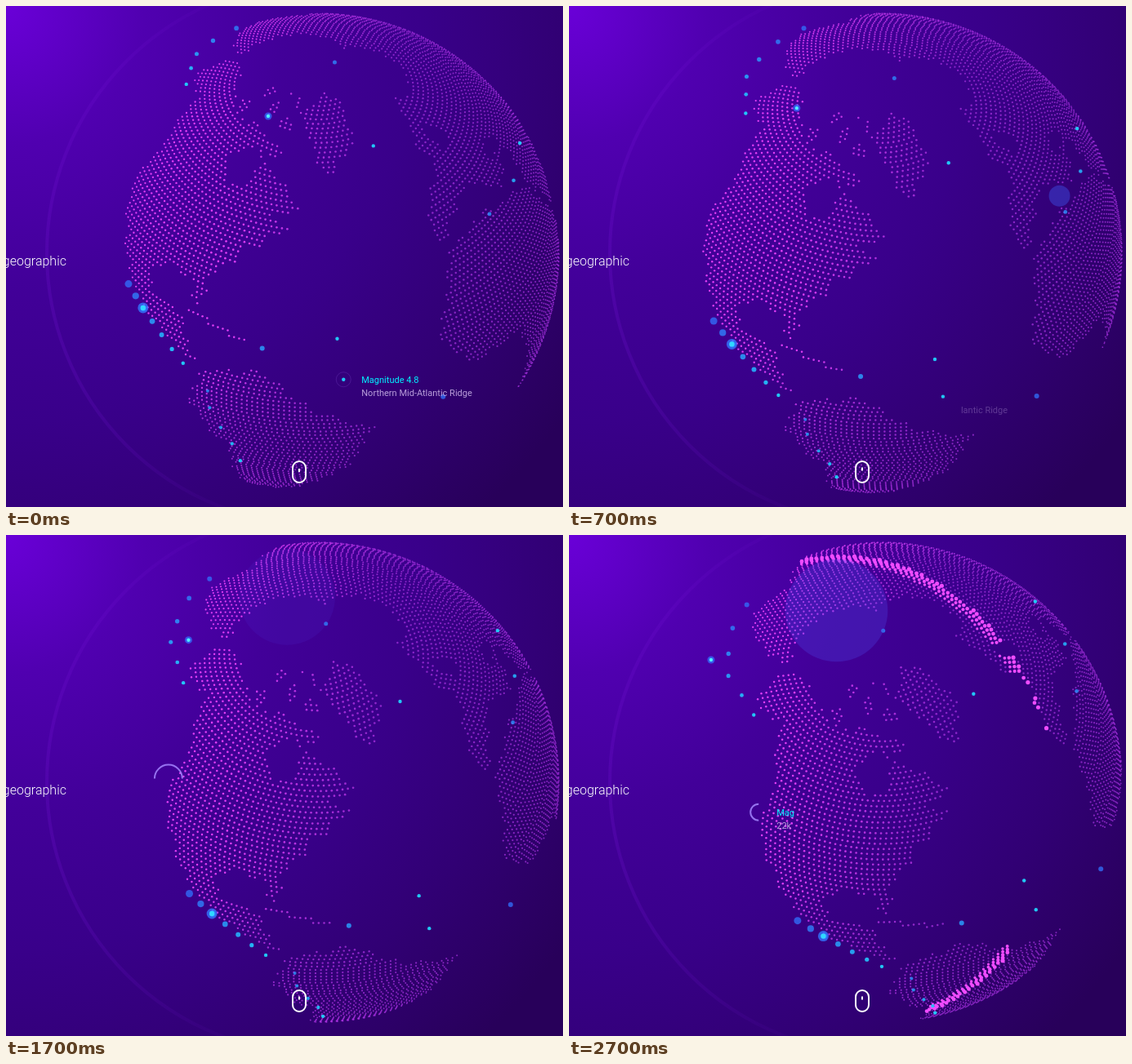
Write an HTML page with a canvas that moves like this. It is 682x614 px and loops after 2.8 s.

```html
<!DOCTYPE html>
<html lang="en">
<head>
<meta charset="utf-8">
<title>Earthquake globe</title>
<style>
  html, body { margin: 0; width: 100%; height: 100%; overflow: hidden; background: #3a0088; }
  canvas { display: block; }
</style>
</head>
<body>
<canvas id="stage" width="682" height="614"></canvas>
<script>
const ctx = document.getElementById('stage').getContext('2d');
const W = 682, H = 614, CX = 383, CY = 303, R = 294, LOOP = 2800, STEP = 100;
const RAD = Math.PI / 180, TAU = Math.PI * 2;
const clamp = (v, lo = 0, hi = 1) => Math.min(hi, Math.max(lo, v));
const mix = (a, b, u) => a + (b - a) * u;

let seed = 7;
function random() {
  seed = (seed * 16807) % 2147483647;
  return seed / 2147483647;
}

// Key corners of each continent as [lon, lat]; coasts are roughened in isLand
const america = [[-166,66],[-156,71],[-110,68],[-82,69],[-78,62],[-65,59],[-56,52],[-66,50],[-59,47],
  [-70,42],[-76,36],[-81,31],[-80,25],[-87,21],[-84,15],[-78,8],[-86,11],[-105,20],[-123,37],[-124,48],[-140,60],[-158,57]];
const greenland = [[-70,78],[-53,70],[-45,60],[-24,69],[-18,81],[-35,84]];
const amazonia = [[-77,8],[-62,11],[-50,1],[-35,-6],[-41,-22],[-58,-38],[-72,-42],[-71,-18],[-81,-5]];
const africa = [[-6,35],[10,37],[32,31],[43,11],[40,-15],[19,-34],[13,-6],[9,4],[-8,4.5],[-17,15],[-10,30]];
const europe = [[-9,37],[-9,43.5],[-4,48.5],[8,54],[5,61],[26,71],[40,67],[40,41],[23,37],[13,45],[3,43]];
const asia = [[40,67],[68,69],[104,77],[140,72],[190,67],[156,51],[137,54],[120,38],[60,25],[45,13],[35,30],[40,41]];
const continents = [america, greenland, amazonia, africa, europe, asia];
// Inland waters as ellipses: lon, lat, half width, half height
const seas = [[-86, 59, 7.5, 5], [-90.5, 25, 7.5, 4.6], [19, 58, 4, 4], [34, 43.5, 6, 2]];

function inside(poly, lon, lat) {
  let hit = false;
  poly.forEach(([x1, y1], i) => {
    const [x2, y2] = poly[(i + 1) % poly.length];
    if ((y1 > lat) !== (y2 > lat) && lon < x1 + (lat - y1) * (x2 - x1) / (y2 - y1)) hit = !hit;
  });
  return hit;
}

function isLand(lon, lat) {
  const x = lon + Math.sin(lat * 1.3), y = lat + .6 * Math.sin(lon * .9);
  const arctic = lat > 63 && lat < 82 && lon > -122 && lon < -64;
  if (arctic && Math.sin(lon * .31) + Math.sin(lat * .9 + lon * .1) > .75) return true;
  const antilles = lon > -84 && lon < -67 && Math.abs(lat - 22 - (lon + 84) * -.22) < .7;
  if (antilles) return true;
  if (seas.some(([sx, sy, rx, ry]) => Math.hypot((x - sx) / rx, (y - sy) / ry) < 1)) return false;
  return continents.some(p => inside(p, x, y) || inside(p, x + 360, y));
}

const dots = [];
const GAP = 1.3;
for (let lat = -45; lat < 84; lat += GAP) {
  const count = Math.round(360 / GAP * Math.cos(lat * RAD));
  for (let i = 0; i < count; i++) {
    const lon = i * 360 / count - 180;
    if (isLand(lon, lat)) dots.push({ lat, lon });
  }
}

// Quakes strung along a fault; glow 0 is blue, 1 is bright cyan
const quakes = [];
function fault(count, [lat1, lon1], [lat2, lon2], bow, size, glow, jitter) {
  for (let i = 0; i < count; i++) {
    const u = i / Math.max(1, count - 1);
    quakes.push({
      lat: mix(lat1, lat2, u) + bow * Math.sin(Math.PI * u) + jitter * (random() - .5),
      lon: mix(lon1, lon2, u) + jitter * (random() - .5),
      r: mix(size, 2.2, u), glow: mix(glow, .9, u)
    });
  }
}
fault(7, [17.7, -104.5], [6.8, -82.9], 1.2, 4.5, 0, 0);
fault(5, [1.7, -76.2], [-22, -69], 0, 2, .3, 2);
fault(6, [44.6, 150], [56, 208], -1, 3, 0, 2);
fault(3, [35.4, 12.5], [32.7, 47.7], 0, 2.4, .3, 0);
fault(2, [17.4, -62.5], [21, -43.5], 0, 3, .4, 0);
fault(2, [83.8, 94], [65.7, -14.7], 0, 2.5, .2, 0);
fault(2, [-2, -17], [10, -42.2], 0, 3, 0, 0);

const ridge = { lat: 10, lon: -42.2, lines: ['Magnitude 4.8', 'Northern Mid-Atlantic Ridge'] };
const coast = { lat: 40.1, lon: -125, lines: ['Mag', '22k'] };

let camera;
function aim(t) {
  const tilt = (42 + 10.6 * t - 1.87 * t * t) * RAD;
  camera = { sin: Math.sin(tilt), cos: Math.cos(tilt), lon: -48.2 - 12.85 * t };
}
function project({ lat, lon }) {
  const s = Math.sin(lat * RAD), c = Math.cos(lat * RAD), d = (lon - camera.lon) * RAD;
  const out = c * Math.cos(d);
  const x = c * Math.sin(d), y = s * camera.cos - out * camera.sin, z = s * camera.sin + out * camera.cos;
  return { x, y, z, px: CX + R * x, py: CY - R * y };
}

function disc(x, y, r, fill) {
  ctx.fillStyle = fill;
  ctx.beginPath();
  ctx.arc(x, y, r, 0, TAU);
  ctx.fill();
}
function arc(x, y, r, from, to, stroke, width) {
  ctx.strokeStyle = stroke;
  ctx.lineWidth = width;
  ctx.beginPath();
  ctx.arc(x, y, r, from, to);
  ctx.stroke();
}
function shade(gradient, ...colors) {
  colors.forEach((color, i) => gradient.addColorStop(i / (colors.length - 1), color));
  return gradient;
}

function drawBackground() {
  ctx.fillStyle = shade(ctx.createRadialGradient(0, 0, 0, 0, 0, 850),
    '#6a00d8', '#5000b0', '#420099', '#39008a', '#310074', '#28005a');
  ctx.fillRect(0, 0, W, H);
  const rim = shade(ctx.createLinearGradient(50, 0, 330, 0), 'rgba(120,20,215,.22)', 'rgba(120,20,215,0)');
  arc(CX, CY, 333, 0, TAU, rim, 4);
}

function drawLand(t) {
  const center = project(coast);
  const front = 127 * (t - 2.1) + 1.8;
  for (const dot of dots) {
    const p = project(dot);
    if (p.z < 0) continue;
    const angle = Math.acos(clamp(p.x * center.x + p.y * center.y + p.z * center.z, -1, 1)) / RAD;
    const behind = front - angle;
    if (t > 2.1 && behind > 0 && behind < 4) {
      disc(p.px, p.py, 2.6 - .25 * behind, '#f04cff');
      continue;
    }
    const lit = clamp((470 - p.px) / 200) * clamp((560 - p.py) / 130, .3, 1);
    disc(p.px, p.py, .85 + .5 * p.z,
      `rgba(${168 + 57 * lit},${50 + 12 * lit},${225 + 20 * lit},${.72 + .28 * lit})`);
  }
}

function drawQuakes(t) {
  for (const quake of quakes) {
    const p = project(quake), { r, glow } = quake;
    if (p.z > 0) disc(p.px, p.py, r, `rgba(${50 - 20 * glow},${115 + 110 * glow},255,${.75 + .2 * glow})`);
  }
  const big = project({ lat: 15.1, lon: -97.5 });
  disc(big.px, big.py, 6.5, 'rgba(50,120,255,.8)');
  disc(big.px, big.py, 3.2, '#30d8ff');

  const arctic = project({ lat: 72.5, lon: 136 });
  disc(arctic.px, arctic.py, 52 + 4 * t, `rgba(75,65,225,${.32 * clamp((t - 1.3) / 1.1)})`);
  const sea = project({ lat: 39, lon: 15 });
  disc(sea.px, sea.py, 13, `rgba(60,80,230,${.45 * clamp(1 - Math.abs(t - .7) / .35)})`);

  // Satellite passing over the Arctic
  const sx = 321 - 62.3 * t + 2.9 * t * t, sy = 135 - 21.4 * t + 10.4 * t * t;
  disc(sx, sy, 4.5, 'rgba(50,110,255,.75)');
  disc(sx, sy, 2.2, '#50f0ff');
}

function drawLabel(place, cut, alpha) {
  if (alpha <= 0) return;
  const p = project(place);
  ctx.font = '11px Roboto, sans-serif';
  place.lines.forEach((line, i) => {
    ctx.fillStyle = i ? `rgba(200,175,230,${alpha * .9})` : `rgba(0,240,255,${alpha})`;
    ctx.fillText(line.slice(cut), p.px + 22, p.py + 4 + 16 * i);
  });
}

function drawLabels(t) {
  const leaving = Math.max(0, t - .5);
  drawLabel(ridge, Math.round(75 * leaving), 1 - 3.2 * leaving);
  drawLabel(coast, 0, clamp((t - 1.95) / .7));

  const p = project(ridge), q = project(coast);
  arc(p.px, p.py, 9, 0, TAU, `rgba(140,90,220,${.25 * clamp(1 - 2 * t)})`, 1);
  const turn = clamp((t - 1.7) / .4);
  const from = Math.PI * (1 - turn / 2);
  arc(q.px, q.py, 17 - 7 * turn, from, from + Math.PI, `rgba(165,135,255,${.85 * clamp((t - 1.4) / .3)})`, 2);
}

function drawInterface(t) {
  ctx.fillStyle = '#fff';
  ctx.font = '300 16px Roboto, sans-serif';
  ctx.textAlign = 'right';
  ctx.fillText('geographic', 74, 318);
  ctx.textAlign = 'left';
  ctx.strokeStyle = '#fff';
  ctx.lineWidth = 2;
  ctx.beginPath();
  ctx.roundRect(351, 558, 16, 26, 8);
  ctx.stroke();
  ctx.fillRect(358, 562.5 + 5 * ((t + .9) % 1), 2, 4);
}

function frame() {
  const t = Math.floor(performance.now() % LOOP / STEP) * STEP / 1000;
  aim(t);
  drawBackground();
  drawLand(t);
  drawQuakes(t);
  drawLabels(t);
  drawInterface(t);
  requestAnimationFrame(frame);
}
frame();
</script>
</body>
</html>
```
